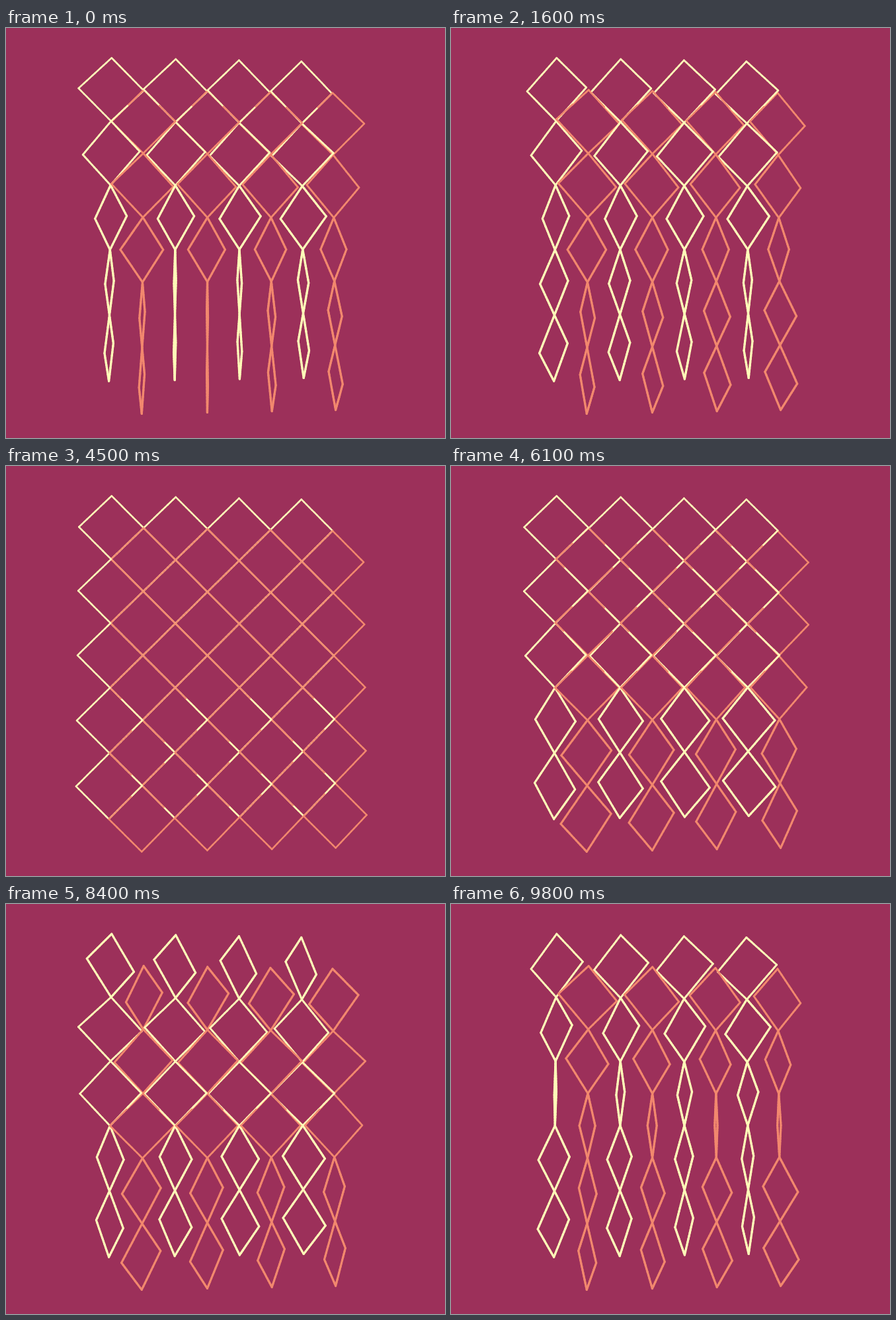
Recreate the animation shown at these times as an HTML page with a canvas. Size 664 by 619 pixels, loop 9.9 s.

```html
<!DOCTYPE html>
<html>
<head>
<meta charset="utf-8">
<style>
  html, body { margin: 0; width: 100%; height: 100%; overflow: hidden; background: #9c305a; }
  canvas { display: block; }
</style>
</head>
<body>
<canvas id="stage" width="664" height="619"></canvas>
<script>
const ctx = document.getElementById('stage').getContext('2d');
const COLUMNS = 8, ROWS = 5, PIECES = 12;
const LOOP = 9900, STEP = 100;
const COLORS = ['#fffdb9', '#f2886e'];
const YAW = 0.069, PITCH = 0.052, DISTANCE = 20, SCALE = 48.12;
const REST = 4.33, SWING = 4.98, SPEED = 0.2;

// Grid position (u, v) lifted by w out of the slightly tilted plane.
function project(u, v, w) {
  const x = u - 4, y = v - 5;
  const depth = w - YAW * x + PITCH * y;
  const k = SCALE / (1 - depth / DISTANCE);
  return {
    x: 352.9 + k * (x + 0.002 * y + YAW * w),
    y: 286.2 + k * (y + 0.0016 * x - PITCH * w),
    depth
  };
}

// Triangle wave: 0 at REST, back down again after SWING seconds.
function progress(seconds) {
  const away = Math.abs(seconds - REST);
  return SPEED * (away < SWING ? away : 2 * SWING - away);
}

function addDiamond(pieces, column, row, p) {
  const odd = column % 2;
  const turn = 2 * Math.PI * p ** Math.max(2, 5 - row) * (odd ? -1 : 1);
  const cos = Math.cos(turn), sin = Math.sin(turn);
  const v = 2 * row + 1 + odd;
  const corners = [[0, -1], [1, 0], [0, 1], [-1, 0]];
  const width = 2.5 + 0.8 * Math.abs(sin);
  corners.forEach(([ax, ay], i) => {
    const [bx, by] = corners[(i + 1) % 4];
    const at = n => {
      const f = n / PIECES, side = ax + (bx - ax) * f;
      return project(column + side * cos, v + ay + (by - ay) * f, side * sin);
    };
    for (let n = 0; n < PIECES; n++) {
      const from = at(n), to = at(n + 1);
      const depth = (from.depth + to.depth) / 2 + odd * 0.002;
      pieces.push({ from, to, depth, width, color: COLORS[odd] });
    }
  });
}

function draw(now) {
  const time = Math.floor((now % LOOP) / STEP) * STEP;
  const p = progress(time / 1000);
  const pieces = [];
  for (let row = 0; row < ROWS; row++)
    for (let column = 0; column < COLUMNS; column++)
      addDiamond(pieces, column, row, p);
  pieces.sort((a, b) => a.depth - b.depth);

  ctx.fillStyle = '#9c305a';
  ctx.fillRect(0, 0, 664, 619);
  ctx.lineCap = 'round';
  for (const { from, to, width, color } of pieces) {
    ctx.strokeStyle = color;
    ctx.lineWidth = width;
    ctx.beginPath();
    ctx.moveTo(from.x, from.y);
    ctx.lineTo(to.x, to.y);
    ctx.stroke();
  }
}

const start = performance.now();
function tick() {
  draw(performance.now() - start);
  requestAnimationFrame(tick);
}
tick();
</script>
</body>
</html>
```
